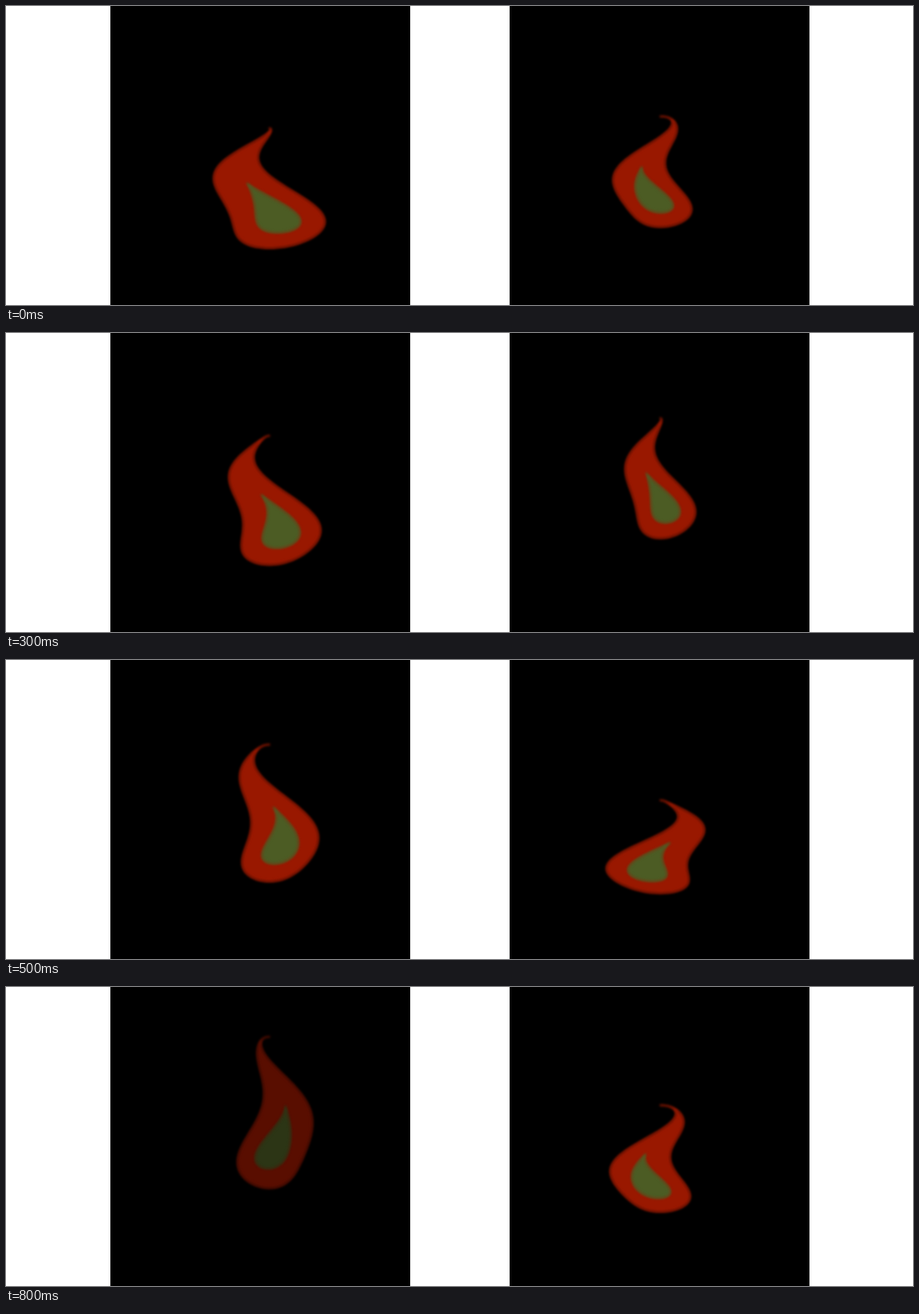
An HTML page with a canvas that plays this animation: 1095x362 px, repeating every 0.9 s.

```html
<!DOCTYPE html>
<html>
<head>
<meta charset="utf-8">
<style>
  html, body { margin: 0; overflow: hidden; background: #fff; }
  canvas { display: block; }
</style>
</head>
<body>
<canvas width="1095" height="362"></canvas>
<script>
const ctx = document.querySelector('canvas').getContext('2d');
const STEP = 100, STEPS = 9, PANEL = 362;
const RED = [153, 24, 0], GREEN = [76, 92, 36];

// Quadratics in age: base and tip heights, half width, and the node of the sway wave.
const flames = [
  { panel: 126, axis: 318, side: -1, birth: 0, fadeAge: 6,
    base: [293, -3, -0.4], tip: [148, -6, -0.62], width: [56, -3.7, 0.21], node: [0.36, 0.03, 0.0028] },
  { panel: 608, axis: 790, side: 1, birth: 4, fadeAge: STEPS,
    base: [284, -1.5, -0.37], tip: [178, -8, -0.17], width: [51, -2.5, 0.07], node: [0.4, 0.07, 0] }
];

const quadratic = ([a, b, c], x) => a + b * x + c * x * x;

// Teardrop half width at height h (0 base, 1 tip), with maximum 1.
const teardrop = h => Math.sqrt(h) * (1 - h) ** 1.5 / 0.325;

// A teardrop between heights `from` and `to`, bent by a wave that climbs with age.
function drawDrop(flame, age, from, to, scale, color) {
  const base = quadratic(flame.base, age);
  const height = base - quadratic(flame.tip, age);
  const width = quadratic(flame.width, age) * scale;
  const node = quadratic(flame.node, age);
  const swing = flame.side * (84 - 4 * age);

  ctx.beginPath();
  for (let i = 0; i < 120; i++) {
    const angle = i / 60 * Math.PI;
    const local = (1 - Math.cos(angle)) / 2;
    const h = from + (to - from) * local;
    const sway = swing * h * (1 - h) ** 0.4 * Math.sin(5.2 * (h - node));
    const edge = Math.sign(Math.sin(angle)) * width * teardrop(local);
    ctx.lineTo(flame.axis + sway + edge, base - height * h);
  }
  ctx.closePath();
  ctx.fillStyle = ctx.strokeStyle = color;
  ctx.fill();
  ctx.stroke();
}

function drawFlame(flame, step) {
  const age = (step - flame.birth + STEPS) % STEPS;
  const light = 1 - 0.21 * Math.max(0, age - flame.fadeAge);
  const shade = rgb => `rgb(${rgb.map(v => v * light)})`;

  ctx.filter = 'none';
  ctx.fillStyle = '#000';
  ctx.fillRect(flame.panel, 0, PANEL, PANEL);
  ctx.filter = 'blur(1.6px)';
  drawDrop(flame, age, 0, 1, 1, shade(RED));
  drawDrop(flame, age, 0.13, 0.54, 0.47, shade(GREEN));
}

function draw() {
  const step = Math.floor(performance.now() / STEP) % STEPS;
  ctx.lineWidth = 2;
  ctx.lineJoin = 'round';
  for (const flame of flames) drawFlame(flame, step);
  requestAnimationFrame(draw);
}
draw();
</script>
</body>
</html>
```
